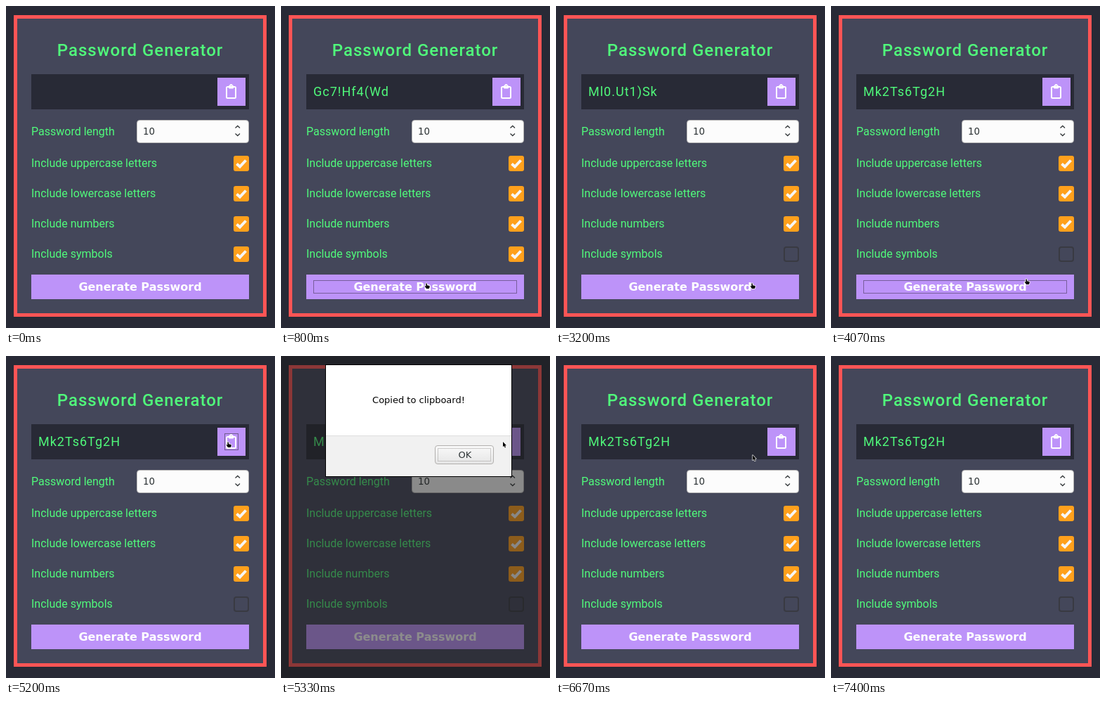
An HTML page with a canvas that plays this animation: 383x458 px, repeating every 7940 ms.

```html
<!DOCTYPE html>
<html lang="en">
<head>
<meta charset="utf-8">
<title>Password Generator</title>
<style>
html, body { margin: 0; width: 100%; height: 100%; overflow: hidden; background: #282a36; }
canvas { display: block; }
</style>
</head>
<body>
<canvas id="stage" width="383" height="458"></canvas>
<script>
const ctx = document.getElementById('stage').getContext('2d');
const LOOP = 7940, FPS = 15;
const GREEN = '#50fa7b', PURPLE = '#bd93f9', DARK = '#282a36', PANEL = '#44475a';
const ROBOTO = 'Roboto, sans-serif', DEJAVU = '"DejaVu Sans", sans-serif';

// All times below are in ticks of 1/15 s.
const passwords = [
  [0, ''], [12, 'Gc7!Hf4(Wd'], [22, 'Ek5=Dn2*Ru'], [27, 'Ml0.Ut1)Sk'],
  [51, 'Ta4Pc7Rf3H'], [57, 'Cn8Er5Pk6H'], [61, 'Mk2Ts6Tg2H']
];
const START = [376, 458];
// from tick, to tick, control x, y, end x, y
const moves = [
  [0, 8, 290, 425, 207, 394],
  [26, 38, 283, 392, 328, 349],
  [41, 49, 310, 385, 276, 395],
  [60, 71, 318, 250, 330, 109],
  [74, 77, 322, 114, 316, 122],
  [86, 97, 300, 128, 280, 141],
  [103, 111, 215, 290, 144, 462]
];

const between = (k, a, b) => k >= a && k < b;
const smooth = u => u * u * (3 - 2 * u);

function fill(color, x, y, w, h) {
  ctx.fillStyle = color;
  ctx.fillRect(x, y, w, h);
}

function box(x, y, w, h, r, color, line, width = 1) {
  ctx.beginPath();
  ctx.roundRect(x, y, w, h, r);
  if (color) { ctx.fillStyle = color; ctx.fill(); }
  if (line) { ctx.strokeStyle = line; ctx.lineWidth = width; ctx.stroke(); }
}

function poly(points, line, width, color) {
  ctx.beginPath();
  points.forEach(([x, y]) => ctx.lineTo(x, y));
  if (color) ctx.closePath();
  ctx.strokeStyle = line;
  ctx.lineWidth = width;
  ctx.stroke();
  if (color) { ctx.fillStyle = color; ctx.fill(); }
}

function text(str, x, y, font, color, align = 'left', spacing = 0) {
  ctx.font = font;
  ctx.fillStyle = color;
  ctx.textAlign = align;
  ctx.letterSpacing = spacing + 'px';
  ctx.fillText(str, x, y);
}

function dotted(x, y, w, h, color) {
  ctx.strokeStyle = color;
  ctx.lineWidth = 1;
  ctx.setLineDash([1, 1]);
  ctx.strokeRect(x + 0.5, y + 0.5, w - 1, h - 1);
  ctx.setLineDash([]);
}

function checkbox(y, checked) {
  if (!checked) {
    box(325, y + 1, 20, 20, 3, null, '#393a42', 2);
    return;
  }
  box(324, y, 22, 22, 3, '#ffa01c');
  poly([[328.5, y + 11.5], [333, y + 15.5], [341.5, y + 6.5]], '#f6f6f6', 4);
}

function clipboard() {
  box(314, 115, 13, 16, 1.5, null, '#fff', 2);
  box(317, 113, 7, 4.5, 1, '#fff');
  ctx.fillStyle = '#fff';
  ctx.beginPath();
  ctx.arc(320.5, 113.3, 2.3, 0, 7);
  ctx.fill();
  fill(PURPLE, 320, 113, 1, 1);
}

function form(k) {
  fill(DARK, 0, 0, 383, 458);
  fill('#ff5555', 11, 13, 360, 429);
  fill(PANEL, 16, 18, 350, 419);
  text('Password Generator', 191, 71, '500 24px ' + ROBOTO, GREEN, 'center', 1);

  fill(DARK, 36, 97, 310, 50);
  const password = passwords.filter(p => p[0] <= k).pop()[1];
  text(password, 46, 128, '18px ' + ROBOTO, GREEN, 'left', 1);
  fill(PURPLE, 301, 102, 40, 40);
  clipboard();
  if (between(k, 78, 80)) dotted(311, 110, 20, 24, '#222');

  text('Password length', 36, 184, '16px ' + ROBOTO, GREEN);
  box(186.5, 162.5, 159, 32, 4, '#fcfcfc', '#b9b8b7');
  text('10', 195, 183, '13.33px ' + DEJAVU, '#2e3436');
  poly([[326.5, 173.5], [329.8, 170.5], [333, 173.5]], '#33383a', 1.3);
  poly([[326.5, 181.5], [329.8, 184.5], [333, 181.5]], '#33383a', 1.3);

  ['uppercase letters', 'lowercase letters', 'numbers', 'symbols'].forEach((name, i) => {
    text('Include ' + name, 36, 229 + i * 43, '16px ' + ROBOTO, GREEN);
    checkbox(213 + i * 43, i < 3 || k < 40);
  });

  fill(PURPLE, 36, 382, 310, 35);
  text('Generate Password', 191, 405, 'bold 16px ' + DEJAVU, '#fff', 'center');
  if (between(k, 10, 39) || between(k, 50, 78)) dotted(46, 390, 290, 19, '#33283f');
}

function dialog() {
  fill('rgba(26,26,26,0.5)', 0, 0, 383, 458);
  fill('#000', 63, 12, 266, 160);
  fill('#fff', 64, 13, 264, 100);
  fill('#f1f1f1', 64, 113, 264, 58);
  fill('#dedede', 64, 113, 264, 1);
  text('Copied to clipboard!', 196, 67, '13px ' + DEJAVU, '#000', 'center');
  const shade = ctx.createLinearGradient(0, 127, 0, 154);
  shade.addColorStop(0, '#fafafa');
  shade.addColorStop(1, '#e5e5e5');
  box(219.5, 127.5, 83, 26, 3.5, shade, '#b2b0ae');
  dotted(223, 131, 76, 19, '#a09e9c');
  text('OK', 262, 145, '13px ' + DEJAVU, '#2e3436', 'center');
}

function cursorAt(k) {
  let [x, y] = START;
  for (const [a, b, cx, cy, ex, ey] of moves) {
    if (k < a) break;
    const s = smooth(Math.min(1, (k - a) / (b - a))), r = 1 - s;
    x = r * r * x + 2 * r * s * cx + s * s * ex;
    y = r * r * y + 2 * r * s * cy + s * s * ey;
  }
  return [Math.round(x), Math.round(y)];
}

const ARROW = [[0, 0], [0, 7.2], [1.6, 5.8], [2.8, 8.4], [4, 7.9], [2.9, 5.4], [5, 5.2]];
const HAND = [[-0.6, 0.6], [0.8, 0.6], [1, 3.2], [4.6, 4], [4.6, 6.2], [3.6, 8], [0, 8],
  [-2.4, 4.6], [-1.6, 4], [-0.6, 5]];

function cursor(k, open) {
  if (!between(k, 1, 111)) return;
  const [x, y] = cursorAt(k);
  const inside = (l, t, w, h) => between(x, l, l + w) && between(y, t, t + h);
  const hand = !open && (inside(36, 382, 310, 35) || inside(301, 102, 40, 40));
  ctx.save();
  ctx.translate(x, y);
  ctx.lineJoin = 'round';
  poly(hand ? HAND : ARROW, '#fff', hand ? 1.6 : 1.2, '#000');
  ctx.restore();
}

function draw(now) {
  const k = Math.floor((now % LOOP + 4) * FPS / 1000);
  const open = between(k, 80, 100);
  form(k);
  if (open) dialog();
  cursor(k, open);
}

const begin = performance.now();
function tick() {
  draw(performance.now() - begin);
  requestAnimationFrame(tick);
}
tick();
</script>
</body>
</html>
```
